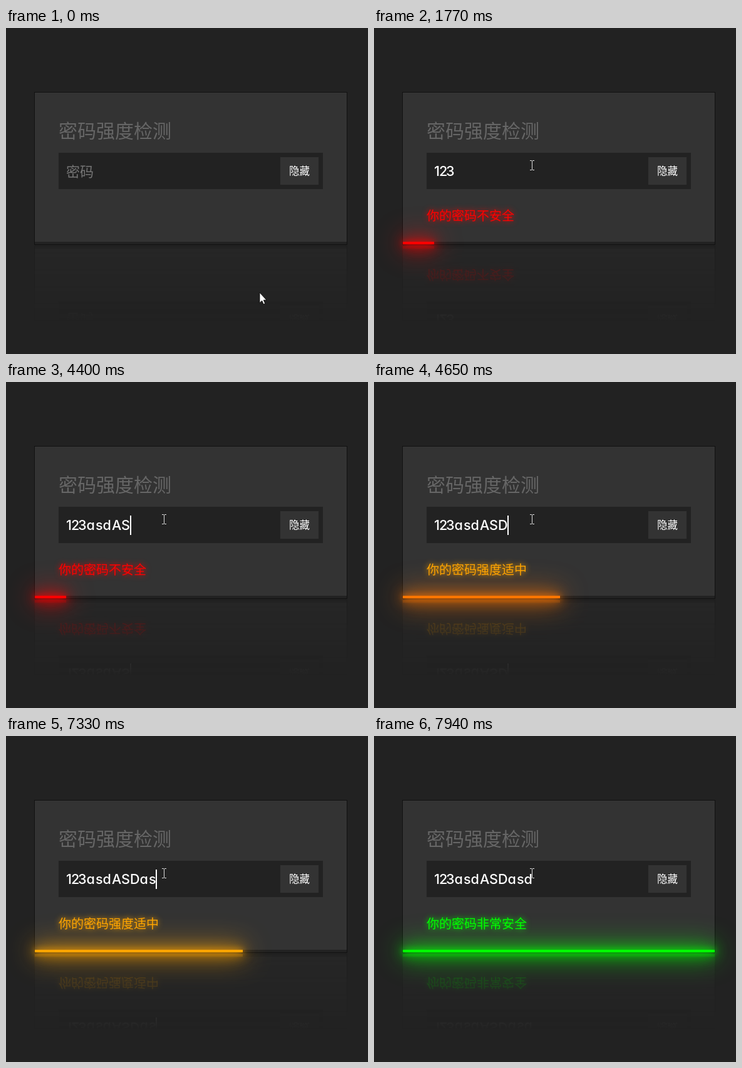
These frames come from a looping animation (578 px wide and 520 px high, 8 s). An HTML page:

```html
<!DOCTYPE html>
<html lang="zh-CN">
<head>
<meta charset="utf-8">
<title>密码强度检测</title>
<style>
  * { box-sizing: border-box; }
  html, body { margin: 0; width: 100%; height: 100%; overflow: hidden; background: #222; }
  body { position: relative; font-family: "Noto Sans CJK SC", "Noto Sans CJK", sans-serif; cursor: none; }
  body *:not(text) { position: absolute; }

  /* every part shares one 8 s clock; hard changes by default */
  .placeholder, .typed, .caret, .msg, .bar, .pointer, .arrow, .beam {
    animation: 8s step-end infinite;
  }

  .box {
    left: 45px; top: 102px; width: 500px; height: 244px;
    background: #333; border: 1px solid #111;
    -webkit-box-reflect: below 1px linear-gradient(transparent, transparent, #0004);
  }
  .title {
    left: 38px; top: 39px; margin: 0;
    font-size: 30px; line-height: 40px; font-weight: 300; color: #666; white-space: nowrap;
  }

  .field { left: 38px; top: 96px; width: 422px; height: 58px; background: #222; }
  .placeholder {
    left: 12px; top: -1px; font-size: 22px; line-height: 58px; color: #757575;
    white-space: nowrap; animation-name: placeholder;
  }
  .typed { left: 12px; top: 0; height: 58px; animation-name: type; }
  .clip { inset: 0; overflow: hidden; }
  .clip svg { left: 0; top: 0; }
  .clip text {
    font: 500 21.6px Inter, "Open Sans", sans-serif;
    font-feature-settings: "cv11"; /* single-storey a */
    fill: #fff;
  }
  .caret { left: 100%; top: 14px; width: 2px; height: 31px; background: #fff; animation-name: blink; }
  .toggle {
    left: 354px; top: 7px; width: 61px; height: 44px; background: #333; color: #fff;
    font-size: 16.5px; line-height: 43px; text-align: center;
  }

  .msg {
    left: 38px; top: 181px; font-size: 20px; line-height: 30px; white-space: nowrap;
    filter: drop-shadow(0 0 5px);
  }
  .weak { color: #f00; animation-name: weak; }
  .medium { color: #ffa500; animation-name: medium; }
  .strong { color: #0f0; animation-name: strong; }

  .track { left: 0; bottom: 0; width: 100%; height: 4px; background: #222; }
  .bar {
    left: 0; top: 0; height: 4px; background: currentColor;
    filter: drop-shadow(0 0 5px) drop-shadow(0 0 10px) drop-shadow(0 0 20px);
    animation-name: grow; animation-timing-function: ease;
  }

  .pointer { left: 0; top: 0; animation-name: move; animation-timing-function: linear; }
  .pointer svg { overflow: visible; left: 0; top: 0; width: 1px; height: 1px; }
  .arrow { animation-name: arrow; }
  .beam { animation-name: beam; }

  @keyframes placeholder { 0% { visibility: visible } 12.875%, 100% { visibility: hidden } }

  @keyframes type {
    0% { width: 0 }
    12.875% { width: 8px }
    13.875% { width: 19px }
    15.75% { width: 32px }
    36.25% { width: 47px }
    37.25% { width: 58px }
    38.375% { width: 73px }
    53.375% { width: 88px }
    54.75% { width: 102px }
    56.25% { width: 117px }
    90.25% { width: 132px }
    91.375% { width: 143px }
    92.375%, 100% { width: 158px }
  }
  @keyframes blink {
    0%, 22.125%, 35.5%, 45.375%, 62.75%, 75.5%, 89.375%, 99.25%, 100% { visibility: hidden }
    7.75%, 29.125%, 36.25%, 51.75%, 69.75%, 83%, 90.25% { visibility: visible }
  }

  @keyframes weak { 0%, 55.5%, 100% { visibility: hidden } 12.875% { visibility: visible } }
  @keyframes medium { 0%, 92.375%, 100% { visibility: hidden } 55.5% { visibility: visible } }
  @keyframes strong { 0% { visibility: hidden } 92.375%, 100% { visibility: visible } }

  @keyframes grow {
    0%, 15.75% { width: 0; color: #f00 }
    22%, 55.5% { width: 10%; color: #f00 }
    61.75%, 92.375% { width: 66.66%; color: #ffa500 }
    98.625%, 100% { width: 100%; color: #0f0 }
  }

  @keyframes move {
    0%, .375% { transform: translate(405px, 422px) }
    1% { transform: translate(385px, 385px) }
    1.625% { transform: translate(335px, 300px) }
    2.25% { transform: translate(290px, 232px) }
    3%, 4.875% { transform: translate(272px, 205px) }
    7.5%, 100% { transform: translate(252px, 219px) }
  }
  @keyframes arrow { 0% { visibility: visible } 2%, 100% { visibility: hidden } }
  @keyframes beam { 0% { visibility: hidden } 2%, 100% { visibility: visible } }
</style>
</head>
<body>
  <div class="box">
    <h2 class="title">密码强度检测</h2>
    <div class="field">
      <div class="placeholder">密码</div>
      <div class="typed">
        <div class="clip">
          <svg width="200" height="58"><text y="37" x="0 8 19 32.5 47 58.5 73 88 102 117.5 132 143.5">123asdASDasd</text></svg>
        </div>
        <div class="caret"></div>
      </div>
      <div class="toggle">隐藏</div>
    </div>
    <div class="msg weak">你的密码不安全</div>
    <div class="msg medium">你的密码强度适中</div>
    <div class="msg strong">你的密码非常安全</div>
    <div class="track"><div class="bar"></div></div>
  </div>

  <div class="pointer">
    <svg class="arrow"><path d="M0 0V16.5L3.7 13L6.2 18.6L8.7 17.5L6.3 12H11Z" fill="#fff" stroke="#000" stroke-width=".8"/></svg>
    <svg class="beam"><path d="M-3 -7.5H0M1 -7.5H4M-3 7.5H0M1 7.5H4M.5 -7V7" fill="none" stroke="#ddd"/></svg>
  </div>
</body>
</html>
```
